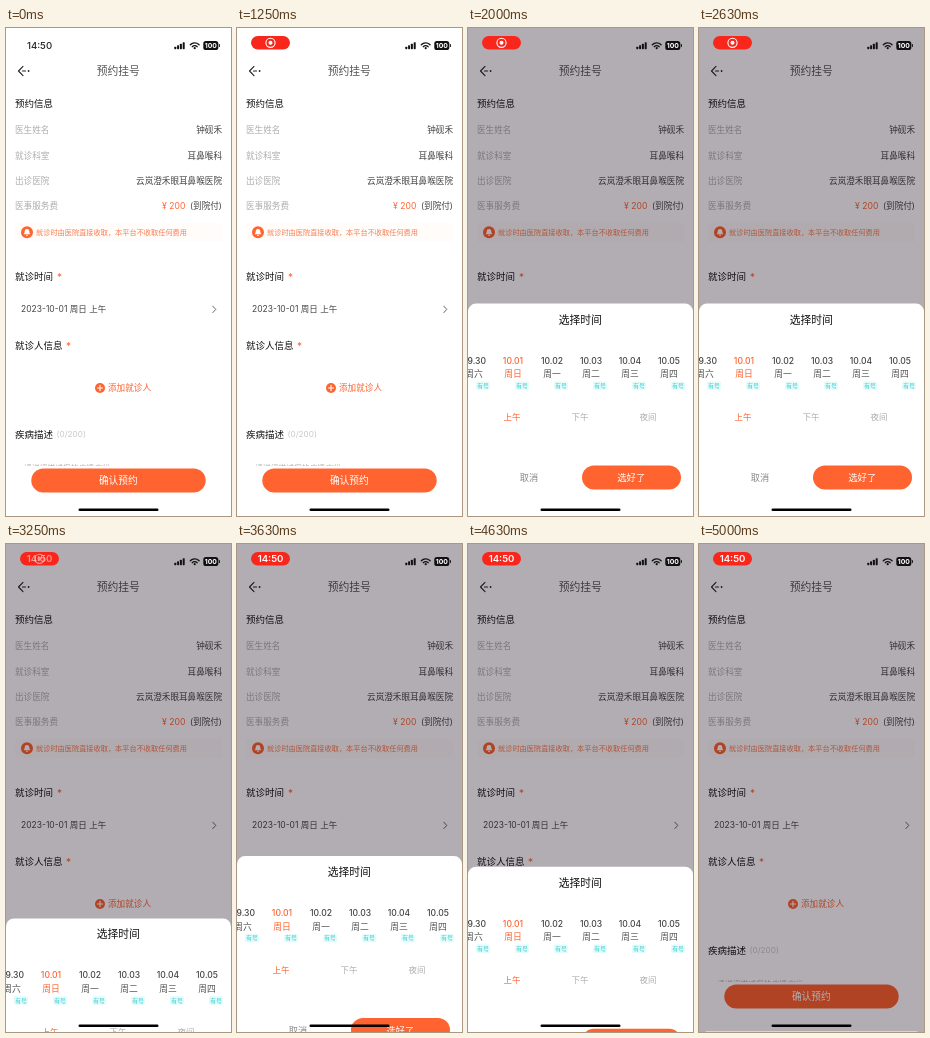
These frames come from a looping animation (225x488 px, 5.12 s). An HTML page with a canvas:

```html
<!DOCTYPE html>
<html lang="zh-CN">
<head>
<meta charset="utf-8">
<title>预约挂号</title>
<style>
html, body { margin: 0; width: 100%; height: 100%; overflow: hidden; background: #fff; }
canvas { display: block; width: 100vw; height: 100vh; }
</style>
</head>
<body>
<canvas></canvas>
<script>
const W = 225, H = 488, LOOP = 5120, STEP = 125;
const ORANGE = '#ff632f', INK = '#444', BLACK = '#111', MUTED = '#adadad';
const FONT = 'Inter, "Noto Sans CJK SC", "Noto Sans CJK", sans-serif';
const canvas = document.querySelector('canvas');
const ctx = canvas.getContext('2d');

const clamp = v => Math.max(0, Math.min(1, v));
const linear = p => p;
const outCubic = p => 1 - (1 - p) ** 3;
const inOut = p => (1 - Math.cos(Math.PI * p)) / 2;
const ramp = (t, from, to, ease = linear) => ease(clamp((t - from) / (to - from)));

// y is the vertical centre of the glyphs
function text(str, x, y, size, color, { align = 'left', weight = 400 } = {}) {
  ctx.font = `${weight} ${size}px ${FONT}`;
  ctx.textAlign = align;
  ctx.fillStyle = color;
  ctx.fillText(str, x, y + size * 0.37);
}

function box(x, y, w, h, r, color) {
  ctx.fillStyle = color;
  ctx.beginPath();
  ctx.roundRect(x, y, w, h, r);
  ctx.fill();
}

function disc(x, y, r, color) {
  ctx.fillStyle = color;
  ctx.beginPath();
  ctx.arc(x, y, r, 0, Math.PI * 2);
  ctx.fill();
}

function line(points, width, color) {
  ctx.lineWidth = width;
  ctx.strokeStyle = color;
  ctx.beginPath();
  points.forEach(([x, y]) => ctx.lineTo(x, y));
  ctx.stroke();
}

function arc(x, y, r, from, to, width, color) {
  ctx.lineWidth = width;
  ctx.strokeStyle = color;
  ctx.beginPath();
  ctx.arc(x, y, r, from * Math.PI, to * Math.PI);
  ctx.stroke();
}

function faded(alpha, draw) {
  if (alpha <= 0) return;
  ctx.save();
  ctx.globalAlpha = alpha;
  draw();
  ctx.restore();
}

function heading(str, y, starX) {
  text(str, 9, y, 9.5, BLACK, { weight: 500 });
  if (starX) text('*', starX, y + 1, 10, ORANGE);
}

function bell(x, y) {
  disc(x, y, 6, ORANGE);
  ctx.fillStyle = '#fff';
  ctx.beginPath();
  ctx.moveTo(x - 3.4, y + 2);
  ctx.quadraticCurveTo(x - 2.3, y + 1, x - 2.3, y - 0.8);
  ctx.arc(x, y - 0.9, 2.3, Math.PI, 0);
  ctx.quadraticCurveTo(x + 2.3, y + 1, x + 3.4, y + 2);
  ctx.fill();
  box(x - 1, y + 2.6, 2, 1, 0.5, '#fff');
}

function drawPage() {
  box(0, 0, W, H, 0, '#fff');

  line([[17, 38.4], [12.5, 43], [17, 47.6]], 1.1, '#222');
  line([[16.5, 43], [19.5, 43]], 1.2, '#222');
  disc(22.6, 43, 0.9, '#222');
  text('预约挂号', 112.3, 43, 10.8, '#555', { align: 'center' });

  heading('预约信息', 75);
  const rows = [
    ['医生姓名', '钟砚禾'],
    ['就诊科室', '耳鼻喉科'],
    ['出诊医院', '云岚澄禾眼耳鼻喉医院'],
    ['医事服务费', '(到院付)']
  ];
  rows.forEach(([label, value], i) => {
    const y = 102.3 + i * 25.3;
    text(label, 9, y, 8.6, MUTED);
    text(value, 216, y, 8.6, INK, { align: 'right' });
  });
  text('¥ 200', 179.3, 178, 8.6, ORANGE, { align: 'right' });

  box(9, 195, 207, 19, 2, '#fffcfa');
  bell(21, 204.2);
  text('就诊时由医院直接收取，本平台不收取任何费用', 30, 204.2, 7.2, '#fa7d52');

  heading('就诊时间', 248, 51);
  text('2023-10-01 周日 上午', 15, 281.2, 8.5, INK);
  line([[206.8, 278.2], [209.8, 281.4], [206.8, 284.6]], 0.9, '#555');

  heading('就诊人信息', 317, 60);
  disc(94, 360, 5, ORANGE);
  line([[91.4, 360], [96.6, 360]], 1.1, '#fff');
  line([[94, 357.4], [94, 362.6]], 1.1, '#fff');
  text('添加就诊人', 102, 360, 8.6, ORANGE);

  heading('疾病描述', 406);
  text('(0/200)', 50.5, 406, 8.2, '#c8c8c8');
  text('请详细描述您的病情症状', 18, 440, 7.8, '#b4b4b4');

  box(0, 438, W, H - 438, 0, '#fff');
  box(25.3, 440.6, 174.4, 24, 12, ORANGE);
  text('确认预约', 112.3, 452.8, 9.7, '#fff', { align: 'center', weight: 500 });
}

function drawSheet(top) {
  if (top >= H) return;
  const center = { align: 'center' };
  box(0, top, W, H - top + 10, [8, 8, 0, 0], '#fff');
  text('选择时间', 112.3, top + 16, 10.8, BLACK, { align: 'center', weight: 500 });

  [...'六日一二三四'].forEach((day, i) => {
    const x = 6 + i * 39;
    const on = i === 1;
    const date = i ? '10.0' + i : '09.30';
    text(date, x, top + 56.8, 8.6, on ? ORANGE : INK, { align: 'center', weight: 500 });
    text('周' + day, x, top + 70.5, 8.8, on ? ORANGE : '#555', center);
    box(x + 2, top + 77.8, 14, 8.4, 1.5, '#e4fbfa');
    text('有号', x + 9, top + 81.9, 5.8, '#35cfd0', center);
  });

  ['上午', '下午', '夜间'].forEach((part, i) => {
    text(part, 44 + i * 68, top + 113.5, 8.5, i ? MUTED : ORANGE, center);
  });

  text('取消', 61, top + 174, 9.2, '#888', center);
  box(114, top + 162, 99, 24, 12, ORANGE);
  text('选好了', 163.3, top + 174, 9.4, '#fff', { align: 'center', weight: 500 });
}

function drawStatus(t) {
  const pill = ramp(t, 380, 630);
  const clock = ramp(t, 3125, 3375);

  faded(1 - pill, () => text('14:50', 33.5, 17.4, 9.6, '#222', { align: 'center', weight: 500 }));
  faded(pill, () => box(14, 8, 39, 13.6, 6.8, '#f8261b'));
  faded(pill * (1 - clock), () => {
    arc(33.5, 14.8, 4.6, 0, 2, 1.1, '#fff');
    disc(33.5, 14.8, 2, '#fff');
  });
  faded(clock, () => text('14:50', 33.5, 14.8, 9.6, '#fff', { align: 'center', weight: 600 }));

  for (let i = 0; i < 4; i++) {
    const h = 2.5 + i * 1.5;
    box(168.3 + i * 2.8, 21.2 - h, 2, h, 0.6, BLACK);
  }

  [3.3, 6].forEach(r => arc(188.7, 20.9, r, -0.76, -0.24, 1.4, BLACK));
  disc(188.7, 20.2, 1.1, BLACK);

  box(197.3, 13, 15, 9, 2.6, BLACK);
  box(212.9, 16, 1, 3, 0.5, BLACK);
  text('100', 204.8, 17.5, 6.8, '#fff', { align: 'center', weight: 700 });
}

function sheetTop(t) {
  const open = 212 * (1 - ramp(t, 1625, 2005, outCubic));
  const drag = 146 * (ramp(t, 3050, 3375, inOut) - ramp(t, 3375, 3750, inOut));
  const close = 212 * ramp(t, 4500, 4900, inOut);
  return 275.6 + open + drag + close;
}

function render(now) {
  const t = Math.floor((now % LOOP) / STEP) * STEP;
  const dpr = window.devicePixelRatio || 1;
  const w = Math.round(innerWidth * dpr), h = Math.round(innerHeight * dpr);
  if (canvas.width !== w || canvas.height !== h) {
    canvas.width = w;
    canvas.height = h;
  }
  ctx.setTransform(w / W, 0, 0, h / H, 0, 0);
  ctx.lineCap = ctx.lineJoin = 'round';

  drawPage();
  faded(0.32 * ramp(t, 1625, 2000), () => box(0, 0, W, H, 0, '#0e0212'));
  drawSheet(sheetTop(t));
  drawStatus(t);
  box(72.5, 480.4, 80, 2.6, 1.3, '#000');
}

const start = performance.now();
function tick() {
  render(performance.now() - start);
  requestAnimationFrame(tick);
}
tick();
</script>
</body>
</html>
```
